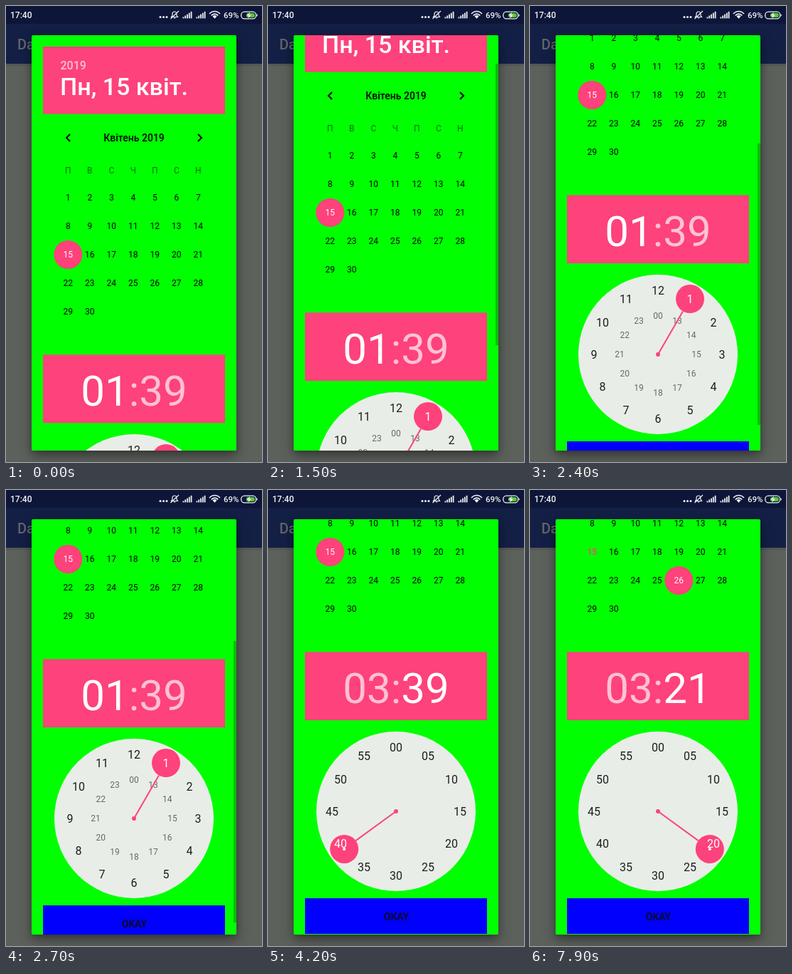
Write an HTML page that moves like this. It is 360 px wide and 640 px high and loops after 8000 ms.

```html
<!DOCTYPE html>
<html lang="uk">
<head>
<meta charset="utf-8">
<title>Date and time dialog</title>
<style>
  html, body { margin: 0; width: 100%; height: 100%; overflow: hidden; background: #5d615c; }
  svg { display: block; position: absolute; left: 0; top: 0; width: 360px; height: 640px;
        font-family: Roboto, "Noto Sans", sans-serif; }
  .shadow { position: absolute; left: 36px; top: 41px; width: 288px; height: 583px; border-radius: 2px;
            box-shadow: 0 8px 18px rgba(0, 0, 0, .35), 0 2px 8px rgba(0, 0, 0, .22); }
  .mid { text-anchor: middle; }
  .med { font-weight: 500; }
</style>
</head>
<body>
<svg viewBox="0 0 360 640">
  <rect width="360" height="640" fill="#5d615c"/>
  <rect y="25" width="360" height="56" fill="#141f46"/>
  <rect y="81" width="360" height="3" fill="#000" opacity=".1"/>
  <text class="med" x="16" y="61" font-size="20" fill="#62666a">Date</text>
</svg>
<div class="shadow"></div>
<svg viewBox="0 0 360 640">
  <defs>
    <clipPath id="window"><rect x="36" y="41" width="288" height="583" rx="2"/></clipPath>
    <clipPath id="hourClip"><circle id="hourHole" r="20"/></clipPath>
    <clipPath id="minuteClip"><circle id="minuteHole" r="20"/></clipPath>
  </defs>
  <rect width="360" height="25" fill="#0d1638"/>
  <g id="status" fill="#f0f2f4"></g>
  <g clip-path="url(#window)">
    <rect x="36" y="41" width="288" height="583" fill="#0f0"/>
    <g id="content"></g>
    <rect id="bar" x="320" width="4" height="395" fill="#000"/>
  </g>
</svg>
<script>
const PINK = '#fe427b', LOOP = 8000, STEP = 100;
const CX = 180, CY = 713, RING = 90, DIM = .68;
const $ = id => document.getElementById(id);

// [time, scroll offset]
const SCROLL = [[600, 0], [900, 4], [1200, 20], [1500, 59], [2000, 165], [2200, 199],
                [2400, 224], [2600, 245], [2800, 258], [2900, 262]];
const HOUR_AT = 3000, MINUTE_MODE = 3200, FADE = [3300, 3800], MINUTE_AT = 4400, DATE_AT = 5000;

const pad = n => String(n).padStart(2, '0');
const range = (n, f) => Array.from({ length: n }, (_, i) => f(i));
const polar = (deg, r) => {
  const a = deg * Math.PI / 180;
  return [CX + r * Math.sin(a), CY - r * Math.cos(a)];
};
const label = (s, x, y, size, attrs = '', cls = 'mid') =>
  `<text class="${cls}" x="${x.toFixed(2)}" y="${(y + size * .355).toFixed(2)}" font-size="${size}" ${attrs}>${s}</text>`;
const ring = (names, r, size, fill) => names.map((s, i) =>
  label(s, ...polar(i * 30, r), size, `fill="${fill}"`)).join('');
const dayPos = d => [87.3 + (d - 1) % 7 * 30.5, 269 + Math.floor((d - 1) / 7) * 40];

function dial(name, big, small) {
  const outer = fill => ring(big, RING, 16, fill);
  return `<g id="${name}s">${outer('#1c1e1c')}${small ? ring(small, 54, 12, '#666966') : ''}
    <line id="${name}Hand" x1="${CX}" y1="${CY}" stroke="${PINK}" stroke-width="2"/>
    <circle id="${name}Knob" r="20" fill="${PINK}"/>
    <g clip-path="url(#${name}Clip)">${outer('#fff')}</g>
    <circle id="${name}Dot" r="2" fill="#fff"/></g>`;
}

function statusBar() {
  const bars = x => range(5, i =>
    `<rect x="${x + i * 2.8}" y="${15.4 - i * 1.9}" width="1.8" height="${2 + i * 1.9}"/>`).join('');
  const arc = r => `<path d="M${293.5 - r * .78} ${17.5 - r * .68}A${r} ${r} 0 0 1 ${293.5 + r * .78} ${17.5 - r * .68}"
    fill="none" stroke="#f0f2f4" stroke-width="1.7"/>`;
  return `<text class="med" x="6" y="17" font-size="12">17:40</text>
    ${range(3, i => `<circle cx="${217 + i * 4.5}" cy="15.6" r="1.5"/>`).join('')}
    <path d="M232.5 15.5h9l-1.5-2.2V11a3 3 0 0 0-6 0v2.3zM235.8 17h2.6M231.5 18L243 7"
      fill="none" stroke="#f0f2f4" stroke-width="1.2"/>
    ${bars(248.5)}${bars(267.5)}${arc(9.5)}${arc(6)}<path d="M293.5 17.8l-3-3.4a4.4 4.4 0 0 1 6 0z"/>
    <text class="med" x="306" y="17" font-size="11.5">69%</text>
    <rect x="330.7" y="8.2" width="21" height="9.6" rx="4.6" fill="none" stroke="#f0f2f4" stroke-width="1.3"/>
    <path d="M352.6 11q2.6 2 0 4z"/>
    <rect x="338" y="10" width="11.8" height="6" rx="2.5" fill="#57c932"/>
    <path d="M343 8.8l-4.5 4.8h2.7l-1 4 4.8-5.2h-2.8z"/>`;
}

function build() {
  const hours = range(12, i => i || 12);
  const inner = range(12, i => i ? i + 12 : '00');
  const minutes = range(12, i => pad(i * 5));
  const days = range(30, i => label(i + 1, ...dayPos(i + 1), 12, `id="day${i + 1}"`)).join('');
  const week = [...'ПВСЧПСН'].map((s, i) => label(s, 87.3 + i * 30.5, 231, 12, 'fill-opacity=".55"')).join('');
  const chevron = (x, d) => `<path d="M${x + d} 180l${-2 * d} 5l${2 * d} 5" fill="none" stroke="#000" stroke-width="2"/>`;

  $('status').innerHTML = statusBar();
  $('content').innerHTML = `
    <rect x="52" y="57" width="256" height="94.6" fill="${PINK}"/>
    <text class="med" x="76.5" y="88.7" font-size="16" fill="#fff" fill-opacity="${DIM}">2019</text>
    <text class="med" x="76" y="125" font-size="34" fill="#fff">Пн, 15 квіт.</text>
    ${chevron(87.5, 2.5)}${chevron(272.5, -2.5)}
    ${label('Квітень 2019', 180, 185, 14, '', 'mid med')}
    ${week}<circle id="picked" r="20" fill="${PINK}"/>${days}
    <rect x="52" y="489.4" width="256" height="95.8" fill="${PINK}"/>
    <g font-size="60" fill="#fff">
      <text id="hh" x="172.7" y="561" text-anchor="end"></text>
      <text class="mid" x="180" y="561" fill-opacity="${DIM}">:</text>
      <text id="mm" x="187.3" y="561"></text>
    </g>
    <circle cx="${CX}" cy="${CY}" r="112" fill="#e9ede8"/>
    ${dial('hour', hours, inner)}${dial('minute', minutes)}
    <circle cx="${CX}" cy="${CY}" r="3" fill="${PINK}"/>
    <rect x="52" y="835" width="256" height="50" fill="#0000fc"/>
    ${label('OKAY', 180.5, 861, 14, 'fill="#0b0b14"', 'mid med')}`;
}

const ramp = (t, a, b) => Math.min(1, Math.max(0, (t - a) / (b - a)));

function scrollAt(t) {
  let y = 0;
  for (let i = 1; i < SCROLL.length; i++) {
    const [t0, y0] = SCROLL[i - 1], [t1, y1] = SCROLL[i];
    y += (y1 - y0) * ramp(t, t0, t1);
  }
  return Math.round(y);
}

const set = (id, attrs) => {
  for (const k in attrs) $(id).setAttribute(k, attrs[k]);
};

function point(name, deg, dot) {
  const [cx, cy] = polar(deg, RING), [x2, y2] = polar(deg, RING - 20);
  set(name + 'Hand', { x2, y2 });
  for (const part of ['Knob', 'Hole', 'Dot']) set(name + part, { cx, cy });
  set(name + 'Dot', { opacity: dot ? 1 : 0 });
}

function draw(t) {
  const y = scrollAt(t);
  const hour = t < HOUR_AT ? 1 : 3, minute = t < MINUTE_AT ? 39 : 21;
  const date = t < DATE_AT ? 15 : 26, minuteMode = t >= MINUTE_MODE;
  const fade = ramp(t, ...FADE);

  set('content', { transform: `translate(0 ${-y})` });
  set('bar', { y: 41 + y * .678, opacity: .26 * ramp(t, 600, 800) * (1 - ramp(t, 3200, 3400)) });

  const [cx, cy] = dayPos(date);
  set('picked', { cx, cy });
  set('day15', { fill: date === 15 ? '#fff' : PINK, 'font-weight': date === 15 ? 400 : 500 });
  set('day26', { fill: date === 26 ? '#fff' : '#000' });

  $('hh').textContent = pad(hour);
  $('mm').textContent = pad(minute);
  set('hh', { 'fill-opacity': minuteMode ? DIM : 1 });
  set('mm', { 'fill-opacity': minuteMode ? 1 : DIM });

  point('hour', hour * 30, false);
  point('minute', minute * 6, minute % 5);
  set('hours', { opacity: 1 - fade });
  set('minutes', { opacity: fade });
}

build();
const start = performance.now();
function tick() {
  const t = (performance.now() - start) % LOOP;
  draw(Math.floor(t / STEP) * STEP);
  requestAnimationFrame(tick);
}
tick();
</script>
</body>
</html>
```
